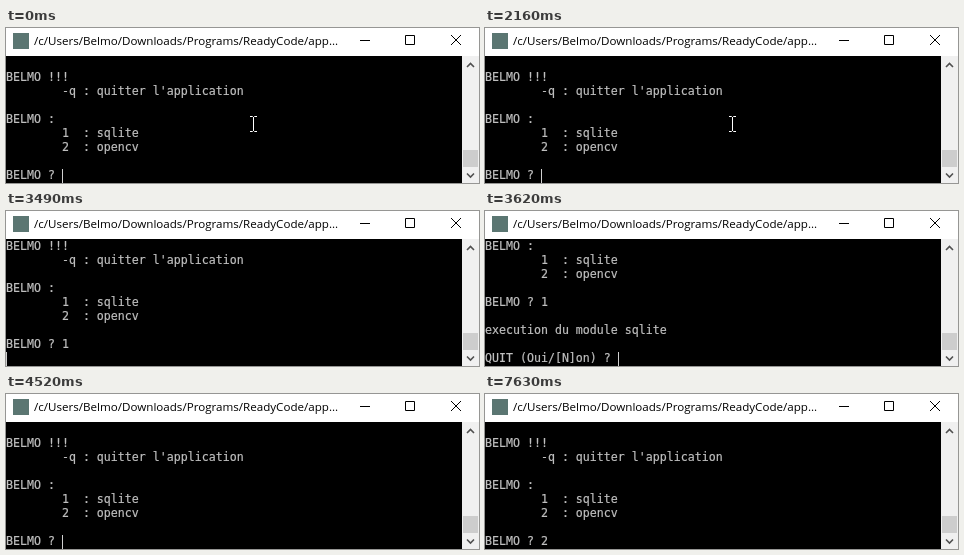
Write an HTML page that moves like this. It is 473 px wide and 155 px high and loops after 8 s.

```html
<!DOCTYPE html>
<html lang="fr">
<head>
<meta charset="utf-8">
<title>Terminal</title>
<style>
html, body { margin: 0; width: 473px; height: 155px; overflow: hidden; background: #000; }
svg, pre, #caret { position: absolute; left: 0; top: 0; }
pre {
  top: 28px; margin: 0; color: #bfbfbf; -webkit-text-stroke: .2px #bfbfbf;
  font: 11.627px/14px "DejaVu Sans Mono", monospace;
}
#caret { width: 1px; height: 14px; top: 141px; background: #d0d0d0; }
text { font: 11.6px "Open Sans", sans-serif; }
</style>
</head>
<body>
<pre id="screen"></pre>
<div id="caret"></div>
<svg width="473" height="155" fill="none">
  <path fill="#fff" d="M0 0H473V28H0Z"/>
  <path fill="#5b7672" d="M7 5H23V21H7Z"/>
  <text x="28" y="17" fill="#000">/c/Users/Belmo/Downloads/Programs/ReadyCode/app...</text>
  <path stroke="#000" d="M354 12.5H364M399.5 7.5H408.5V16.5H399.5ZM445 7L455 17M455 7L445 17"/>
  <path fill="#f0f0f0" d="M456 28H473V155H456Z"/>
  <path fill="#cdcdcd" d="M457 122H472V139H457Z"/>
  <path stroke="#505050" stroke-width="1.6" d="M461 39L464.5 35.5L468 39M461 145.5L464.5 149L468 145.5"/>
  <path id="pointer" stroke="#fff" d="M244 88.5H246.5L247.5 89.5L248.5 88.5H251M247.5 89V103M244 103.5H246.5L247.5 102.5L248.5 103.5H251"/>
</svg>
<script>
const LOOP = 8000, CELL = 7;
const $ = id => document.getElementById(id);
const pad = ' '.repeat(8);
const choices = ['BELMO :', pad + '1  : sqlite', pad + '2  : opencv', ''];
const menu = ['', 'BELMO !!!', pad + "-q : quitter l'application", '', ...choices];
const ask = 'BELMO ? ';

// Start time and lines of each screen
const screens = [
  [0, [...menu, ask]],
  [2640, [...menu, ask + '1']],
  [3490, [...menu.slice(1), ask + '1', '']],
  [3620, [...choices, ask + '1', '', 'execution du module sqlite', '', 'QUIT (Oui/[N]on) ? ']],
  [4520, [...menu, ask]],
  [7090, [...menu, ask + '2']]
];
// Intervals in which the caret is hidden
const hidden = [[570, 1140], [1560, 2160], [3070, 3490], [4070, 4520],
  [5090, 5520], [6110, 6670], [7630, LOOP]];

let shown;
function draw() {
  const t = performance.now() % LOOP;
  const lines = screens.findLast(s => t >= s[0])[1];
  if (lines !== shown) {
    shown = lines;
    $('screen').textContent = lines.join('\n');
    $('caret').style.left = lines.at(-1).length * CELL + 'px';
  }
  $('caret').style.opacity = hidden.some(([a, b]) => t >= a && t < b) ? 0 : 1;
  $('pointer').style.opacity = t < 2640 ? 1 : 0;
  requestAnimationFrame(draw);
}
draw();
</script>
</body>
</html>
```
